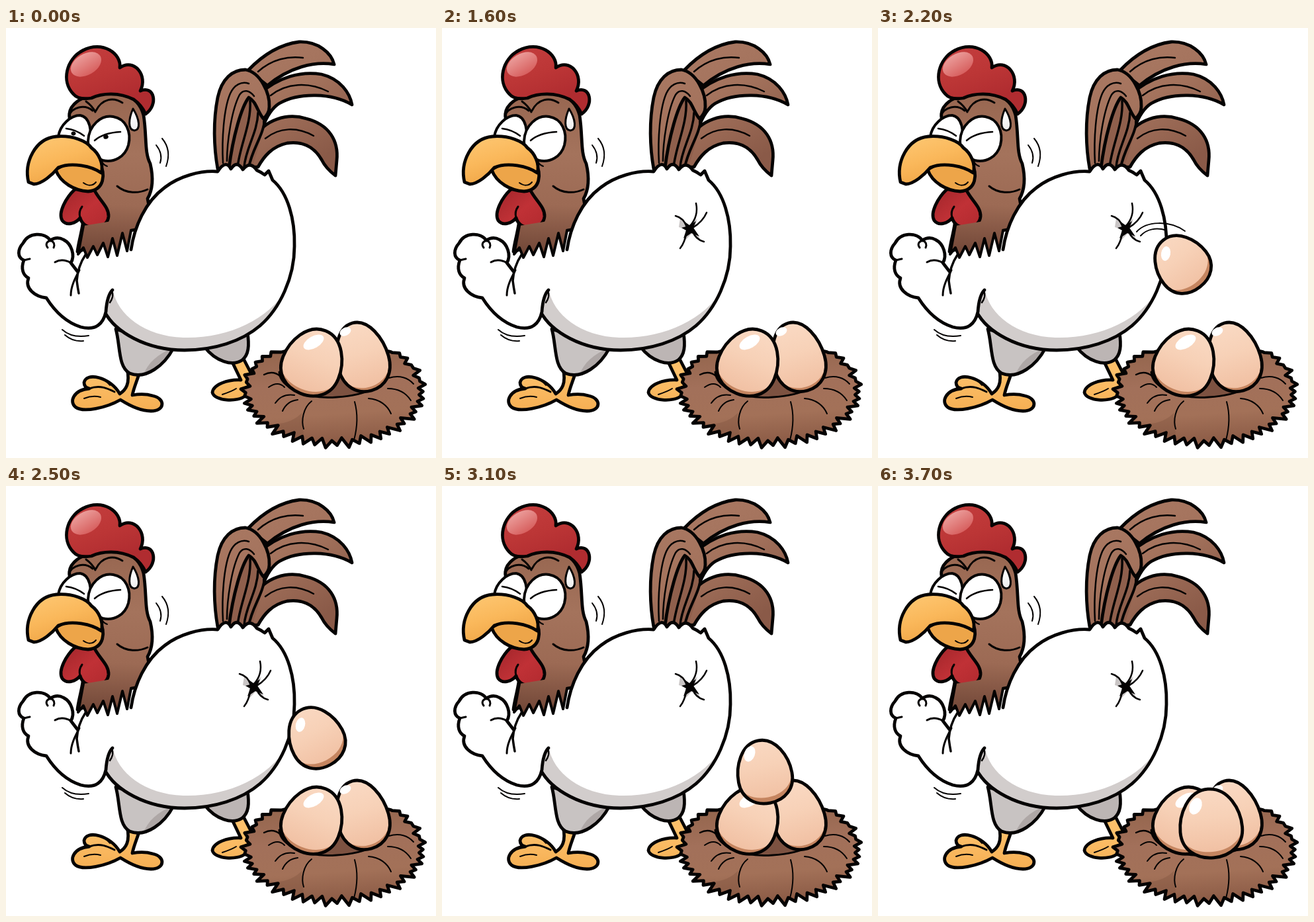
These frames come from a looping animation (650x650 px, 4.4 s). An HTML page with a canvas:

```html
<!DOCTYPE html>
<html lang="en">
<head>
<meta charset="utf-8">
<title>Hen laying an egg</title>
<style>
html, body { margin: 0; width: 100%; height: 100%; overflow: hidden; background: #fff; }
canvas { display: block; width: 100vw; height: 100vh; }
</style>
</head>
<body>
<canvas id="stage" width="650" height="650"></canvas>
<script>
const ctx = document.getElementById('stage').getContext('2d');
const INK = '#050303', GREY = '#d2cdcc';

function shape(d, fill, width = 4.8) {
  const path = new Path2D(d);
  if (fill) { ctx.fillStyle = fill; ctx.fill(path); }
  if (width) { ctx.lineWidth = width; ctx.strokeStyle = INK; ctx.stroke(path); }
}

const line = (d, width = 2.5) => shape(d, null, width);

function oval(x, y, rx, ry, turn, fill) {
  ctx.beginPath();
  ctx.ellipse(x, y, rx, ry, turn * Math.PI / 180, 0, Math.PI * 2);
  ctx.fillStyle = fill;
  ctx.fill();
}

function blend(x0, y0, x1, y1, ...colors) {
  const g = ctx.createLinearGradient(x0, y0, x1, y1);
  colors.forEach((c, i) => g.addColorStop(i / (colors.length - 1), c));
  return g;
}

// Paint details inside a closed outline, then ink the outline.
function inside(d, fill, details) {
  ctx.save();
  ctx.clip(new Path2D(d));
  shape(d, fill, 0);
  details();
  ctx.restore();
  shape(d, null);
}

const neckFill = blend(150, 110, 140, 345, '#996852', '#a4735c', '#9c6a54', '#6f4536');
const footFill = blend(0, 525, 0, 580, '#fdc06a', '#f5ae52');

function tail() {
  const fill = blend(330, 20, 450, 215, '#ab7a64', '#a4735d', '#8a5a48');
  shape('M366 64 C386 43 412 25 443 21 C472 20 492 38 496 55 C466 50 429 59 395 87 Z', fill);
  line('M381 66 C402 47 427 42 449 45');
  shape('M380 102 C412 73 447 65 477 70 C506 77 520 99 523 116 C493 98 443 97 413 114 C400 122 393 137 388 150 Z', fill);
  line('M400 102 C424 83 457 81 487 96');
  shape('M374 167 C392 138 425 128 454 137 C489 146 503 171 500 200 L498 223 C487 215 481 207 477 199 C465 178 446 171 425 174 C402 179 390 194 381 210 L360 212 Z', fill);
  line('M392 167 C413 150 440 149 465 163');
  shape('M330 212 L345 160 L367 104 L388 137 C390 160 380 185 372 212 Z', '#8f5f4c', 0);
  line('M369 110 C371 145 354 176 350 210', 3.5);
  line('M381 128 C380 159 362 182 360 210', 3.5);
  line('M391 137 C390 162 371 184 367 211', 4);
  shape('M320 213 C314 180 313 140 320 105 C326 77 342 63 362 63 C385 67 399 99 398 119 C398 127 395 132 389 137 C380 126 378 111 367 105 C356 119 343 164 337 212 Z', fill);
  line('M328 204 C326 169 329 122 339 99 C345 86 356 80 367 84');
  line('M334 201 C334 172 341 124 353 101 C359 92 368 94 375 103');
}

function foot(d) {
  shape(d, footFill);
}

function legs() {
  foot('M342 505 L355 532 C335 531 313 539 312 551 C315 564 350 566 362 556 L372 525 L359 500 Z');
  shape('M300 482 C317 504 342 512 357 502 C367 494 368 480 365 460 Z', '#bcb5b4');
  line('M327 554 C336 551 342 549 348 545', 2);
  foot('M183 515 C188 538 181 547 172 553 C158 528 121 519 118 536 C118 541 121 544 126 545 C102 547 95 565 105 573 C117 582 152 574 173 562 C184 569 201 579 219 579 C241 579 241 560 222 556 C212 553 202 553 191 555 C193 544 198 534 203 517 Z');
  line('M126 545 C142 539 154 545 164 550', 3);
  line('M142 529 C149 531 153 535 157 540', 2);
  line('M118 560 C128 556 135 556 143 558', 2);
  inside('M166 455 C173 480 169 512 187 522 C212 532 240 509 253 484 Z', '#c8c3c2', () => {
    shape('M260 480 C230 492 212 506 206 530 L250 530 Z', '#aea7a6', 0);
  });
}

function comb() {
  shape('M102 100 C83 81 91 47 116 34 C146 18 175 39 172 60 C194 45 215 72 203 95 C224 86 231 116 211 130 C206 119 200 113 193 108 C171 97 146 98 129 106 C116 108 107 106 102 100 Z', blend(120, 30, 150, 115, '#c33d3d', '#bc3636', '#b02c30'));
  oval(121, 55, 25, 16, -30, blend(108, 40, 128, 72, '#eda3a0', '#d65c5b'));
}

function beak() {
  shape('M75 214 C82 234 104 246 124 247 C149 245 151 221 141 203 L110 195 Z', '#eda549');
  shape('M34 233 C27 203 44 167 76 164 C101 162 122 171 129 181 C140 189 148 205 144 219 C130 209 99 202 79 211 C70 222 54 236 42 236 Z', blend(65, 165, 85, 232, '#fdc56f', '#fab85b', '#f0a647'));
  line('M117 234 C124 239 131 239 136 233', 2);
}

function head() {
  shape('M96 136 C93 119 109 108 122 104 C163 85 200 100 208 132 C213 164 209 188 218 205 C223 226 222 244 214 258 L222 300 L189 306 L160 322 L108 338 C110 318 119 299 117 270 L105 220 Z', neckFill);
  comb();
  line('M168 239 C182 251 201 250 214 244', 3);
  line('M145 195 C143 202 147 207 153 209', 2);
  line('M95 133 C100 119 119 115 131 125', 3);
  line('M121 111 C128 116 132 121 135 127', 3);
  line('M136 125 C145 107 162 104 176 113', 3);
  shape('M79 164 C82 146 98 132 112 132 C126 134 132 155 125 181 L80 177 Z', '#fff', 4);
  shape('M124 171 C125 147 144 131 162 134 C181 137 190 157 185 177 C180 195 163 204 146 200 C132 195 124 185 124 171 Z', '#fff', 4);
  shape('M192 122 C185 138 184 154 194 155 C204 154 202 138 192 122 Z', blend(188, 130, 201, 150, '#fff', '#ededed'), 3);
  shape('M104 244 C91 256 78 279 85 291 C92 300 106 295 112 287 C118 309 153 306 155 285 C156 270 140 260 132 242 Z', blend(95, 250, 140, 305, '#a8282d', '#c03136', '#b42b30'));
  line('M112 287 C110 280 112 274 115 270', 3);
  beak();
}

function body() {
  const outline = 'M189 335 C194 301 210 263 240 241 C262 224 294 215 320 217 Q332 198 340 213 Q349 199 358 214 Q369 200 379 215 Q386 218 391 222 L397 216 L403 230 C426 249 437 289 436 330 C436 377 414 424 384 450 C356 474 314 487 270 487 C211 487 165 459 149 429';
  const d = outline + ' L112 405 L109 373 L119 342 Z';
  ctx.save();
  ctx.clip(new Path2D(d));
  shape(d, '#fff', 0);
  shape('M161 394 C168 434 210 466 268 468 C333 470 396 442 424 395 L440 430 L390 495 L150 495 L145 430 Z', GREY, 0);
  ctx.restore();
  line(outline, 4.8);
}

function arm() {
  const fist = 'M108 368 L98 355 C105 344 99 326 87 320 C80 316 73 317 67 321 C58 308 34 309 26 325 C17 335 17 347 27 351 C22 364 26 374 34 378 C28 394 44 406 61 408 C73 427 91 445 113 452 C136 458 147 447 151 429 C152 414 155 402 161 396';
  shape(fist + ' L170 370 L160 340 L119 344 Z', '#fff', 0);
  line(fist, 4.8);
  line('M120 343 C112 355 108 369 107 382 C108 390 109 396 110 401', 3.5);
  line('M111 366 C104 379 98 391 98 404', 3);
  line('M67 321 C60 324 60 328 63 332', 3);
  line('M67 321 C73 323 74 328 72 332', 3);
  line('M98 355 C89 350 81 350 74 354', 3);
  line('M27 351 L36 349', 3);
  line('M160 398 C163 404 160 411 157 415');

  const fringe = ' L109 342 L117 332 L123 347 L132 330 L138 343 L147 325 L154 346 L161 318 L168 344 L176 310 L183 337 L189 306';
  shape('M117 299' + fringe + ' L172 290 Z', neckFill, 0);
  line('M117 299' + fringe, 4);

  line('M85 456 C94 464 108 468 125 465', 2);
  line('M89 464 C97 471 107 474 117 473', 2);
  line('M236 167 C247 180 247 195 242 209', 2);
  line('M227 177 C235 187 236 195 233 204', 2);
}

const eggFill = blend(0, -50, 0, 50, '#fadac4', '#f7d1b7', '#f1c1a4');

function egg(x, y, a, b, turn, glint, shade = 9) {
  const d = `M0 ${-b} C${a * .66} ${-b} ${a} ${-b * .32} ${a} ${b * .18} C${a} ${b * .7} ${a * .56} ${b} 0 ${b} C${-a * .56} ${b} ${-a} ${b * .7} ${-a} ${b * .18} C${-a} ${-b * .32} ${-a * .66} ${-b} 0 ${-b} Z`;
  ctx.save();
  ctx.translate(x, y);
  ctx.rotate(turn * Math.PI / 180);
  inside(d, '#c58560', () => {
    ctx.translate(shade * -.15, -shade);
    ctx.scale(1.06, 1);
    shape(d, eggFill, 0);
  });
  ctx.restore();
  const [gx, gy, rx, ry, spin] = glint;
  oval(gx, gy, rx, ry, spin, '#fff');
}

function nest() {
  const teeth = 38, from = -.84, span = Math.PI + 1.68;
  const point = (a, k) => `${495 + 137 * k * Math.cos(a)} ${549 + 84 * k * Math.sin(a)}`;
  let d = 'M416 490 C450 480 545 480 ' + point(from, .95);
  for (let i = 0; i < teeth; i++) {
    const a = from + span * i / teeth, low = Math.max(0, Math.sin(a));
    const rough = .025 * Math.sin(i * 2.7);
    d += ` L${point(a + .02, .95 - .08 * low + rough)} L${point(a + .085, 1 + rough)}`;
  }
  inside(d + ' Z', blend(490, 490, 500, 630, '#96674f', '#a2705a', '#a37158', '#8a5a45'), () => {
    shape('M350 575 C390 610 430 600 447 582 L452 640 L350 640 Z', 'rgba(125,80,60,.35)', 0);
  });
  oval(496, 525, 83, 33, 0, '#7d5241');
  line('M413 520 C414 542 451 562 500 558 C546 555 578 539 579 518', 3);
  line('M390 524 C400 519 408 521 414 526');
  line('M397 543 C407 536 415 537 421 543', 2);
  line('M407 567 C414 557 424 553 436 555 M418 579 C423 568 432 563 441 562', 2);
  line('M462 564 C449 574 446 594 450 606 M527 565 C532 583 531 604 526 623', 2);
  line('M548 560 C565 561 577 571 582 583 M577 545 C593 545 605 552 612 563', 2);
  line('M579 529 C595 524 608 529 616 538', 2);
  egg(538, 497, 39, 53, -16, [513, 459, 9, 6, -28], 6);
  egg(464, 505, 45, 51, 22, [465, 475, 17, 9, -30], 7);
}

function hole(strength) {
  ctx.save();
  ctx.globalAlpha = strength;
  shape('M360 288 L358 301 L372 305 L363 326 L377 311 L391 321 L381 303 L386 288 L373 299 Z', '#c9c5c5', 0);
  shape('M364 291 L374 298 L384 292 L380 302 L389 315 L377 310 L365 318 L369 306 L362 302 L369 300 Z', INK, 0);
  line('M353 284 C361 286 367 291 370 301');
  line('M384 265 C387 279 383 290 375 299');
  line('M400 279 C395 291 387 297 379 302');
  line('M379 307 C382 316 388 321 396 323');
  line('M370 307 C368 319 365 327 360 333');
  ctx.restore();
}

function eyes(open) {
  if (open) {
    oval(102, 159.5, 3.5, 3, 10, INK);
    oval(151, 164.5, 3.8, 3.3, -10, INK);
  }
  line('M91 152 C101 153 110 157 118 163', 2.6);
  line('M134 170 C143 162 156 158 173 157', 2.6);
}

// Falling egg poses: centre, half axes, tilt, glint
const drop = [
  [439, 330, 37, 41, -40, [418, 316, 6, 9, 8]],
  [459, 356, 40, 45, -38, [435, 341, 7, 11, 10]],
  [468, 380, 41, 47, -28, [445, 361, 7, 11, 14]],
  [480, 407, 41, 48, -17, [458, 378, 8, 12, 22]],
  [487, 432, 41, 48, -11, [465, 405, 8, 12, 20]],
  [494, 461, 41, 48, -6, [473, 435, 9, 13, 20]],
  [503, 510, 47, 52, -5, [480, 484, 9, 13, 24]]
];

function draw(now) {
  const t = now % 4400;
  const step = t < 700 ? 0 : Math.min(11, 1 + Math.floor((t - 700) / 300));
  ctx.fillStyle = '#fff';
  ctx.fillRect(0, 0, 650, 650);
  ctx.lineCap = ctx.lineJoin = 'round';
  tail();
  head();
  eyes(step === 0);
  legs();
  body();
  arm();
  if (step > 1) hole([.6, .8, 1][Math.min(step, 4) - 2]);
  nest();
  if (step === 6) {
    line('M391 308 C405 292 440 290 464 307', 2);
    line('M397 314 C406 304 421 301 436 306', 2);
  }
  if (step > 4) egg(...drop[step - 5]);
  requestAnimationFrame(draw);
}

requestAnimationFrame(draw);
</script>
</body>
</html>
```
